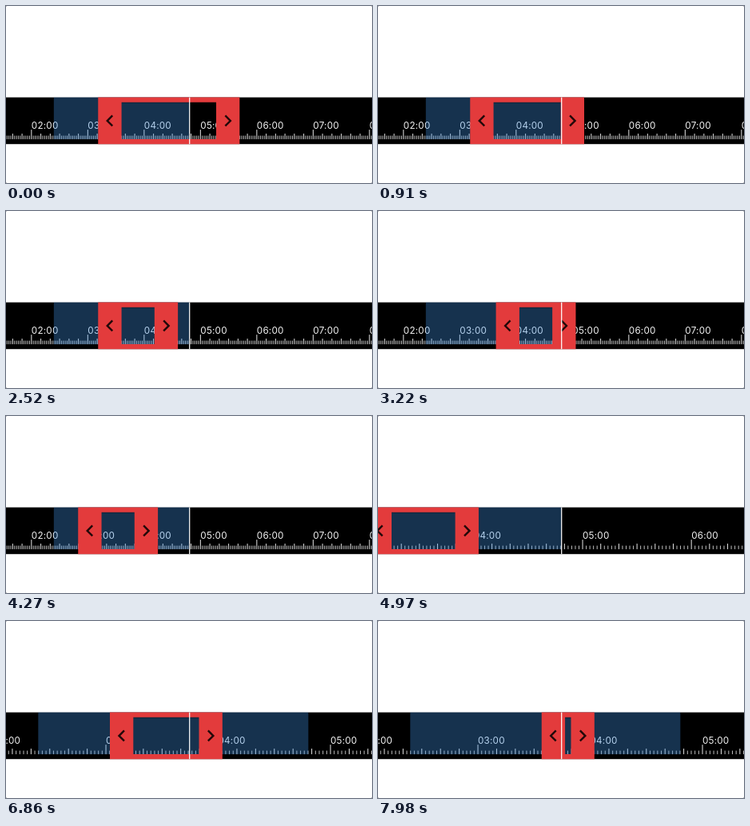
An HTML page with a canvas for the animation above (8000 ms loop, 458 by 222 pixels).

```html
<!DOCTYPE html>
<html lang="en">
<head>
<meta charset="utf-8">
<title>Timeline trimmer</title>
<style>
  html, body { margin: 0; width: 100%; height: 100%; overflow: hidden; background: #777; }
  canvas { display: block; width: 458px; height: 222px; border-radius: 2px; background: #fff; }
</style>
</head>
<body>
<canvas id="stage"></canvas>
<script>
const W = 458, H = 222, LOOP = 8000, STEP = 70;
const U = W / 375;                       // one layout unit in px
const MID = 143.9, TOP = MID - 24 * U, BOTTOM = MID + 24 * U;
const BAR = 5 * U, GRIP = 24 * U, BASE = BOTTOM - BAR;
const HEAD = 229.7;
const CLIP_IN = 2.397, CLIP_OUT = 4.803; // minutes

const cv = document.getElementById('stage');
const g = cv.getContext('2d');
const dpr = window.devicePixelRatio || 1;
cv.width = W * dpr;
cv.height = H * dpr;

const part = (t, a, b) => Math.min(1, Math.max(0, (t - a) / (b - a)));
const easeOut = (u, p) => 1 - (1 - u) ** p;
const smooth = u => u * u * (3 - 2 * u);
const mix = (a, b, u) => a + (b - a) * u;

// Trim the end, swing the range right then left, zoom in, scroll back, trim the start.
function pose(t) {
  const swing = 0.66 * smooth(part(t, 2660, 3080)) - 1.015 * smooth(part(t, 3080, 3570));
  return {
    px: mix(70.5, 140.5, easeOut(part(t, 4550, 5110), 2)),
    mid: mix(4.8065, 3.745, easeOut(part(t, 5040, 6650), 1.5)),
    left: mix(3.599, 4.131, easeOut(part(t, 7000, 7490), 1.5)) + swing,
    right: mix(5.279, 4.184, easeOut(part(t, 70, 2520), 1.4)) + swing
  };
}

function box(color, x0, y0, x1, y1) {
  g.fillStyle = color;
  g.fillRect(x0, y0, x1 - x0, y1 - y0);
}

function ruler(toX, px, mid) {
  const from = Math.floor((mid - HEAD / px - 0.5) * 30);
  const to = Math.ceil((mid + HEAD / px + 0.1) * 30);
  g.font = '11.7px Inter, Roboto, sans-serif';
  g.letterSpacing = '0.2px';
  for (let i = from; i <= to; i++) {
    const x = toX(i / 30);
    const major = i % 30 === 0, medium = i % 5 === 0;
    const tall = major ? 12 : medium ? 7 : 4.5;
    box(medium ? '#e6e6e6' : '#bdbdbd', x - 0.5, BASE - tall, x + 0.5, BASE);
    if (major) {
      g.fillStyle = '#f4f4f4';
      g.fillText(String(i / 30).padStart(2, '0') + ':00', x, 154);
    }
  }
}

function chevron(x, dir) {
  g.save();
  g.translate(x, MID);
  g.scale(U * dir, U);
  g.fillStyle = 'rgba(0,0,0,.85)';
  g.fill(new Path2D('M3.4-4.6 2-6-4 0 2 6 3.4 4.6-1.2 0Z'));
  g.restore();
}

function trimmer(a, b) {
  box('rgba(0,0,0,.35)', a, TOP + BAR, b, TOP + BAR + 1);
  g.beginPath();
  g.rect(a - GRIP, TOP, b - a + 2 * GRIP, BOTTOM - TOP);
  g.rect(a, TOP + BAR, b - a, BASE - TOP - BAR);
  g.fillStyle = '#e33b3c';
  g.fill('evenodd');
  chevron(a - GRIP / 2, 1);
  chevron(b + GRIP / 2, -1);
}

function draw(t) {
  const { px, mid, left, right } = pose(t);
  const toX = m => HEAD + (m - mid) * px;

  g.setTransform(dpr, 0, 0, dpr, 0, 0);
  box('#fff', 0, 0, W, H);
  box('#000', 0, TOP, W, BOTTOM);
  ruler(toX, px, mid);
  box('rgba(63,143,223,.35)', toX(CLIP_IN), TOP, toX(CLIP_OUT), BASE);
  trimmer(toX(left), toX(right));
  box('#fff', HEAD - U / 2, TOP, HEAD + U / 2, BOTTOM);
}

const start = performance.now();
function frame() {
  const t = (performance.now() - start) % LOOP;
  draw(Math.floor(t / STEP) * STEP);
  requestAnimationFrame(frame);
}
frame();
</script>
</body>
</html>
```
